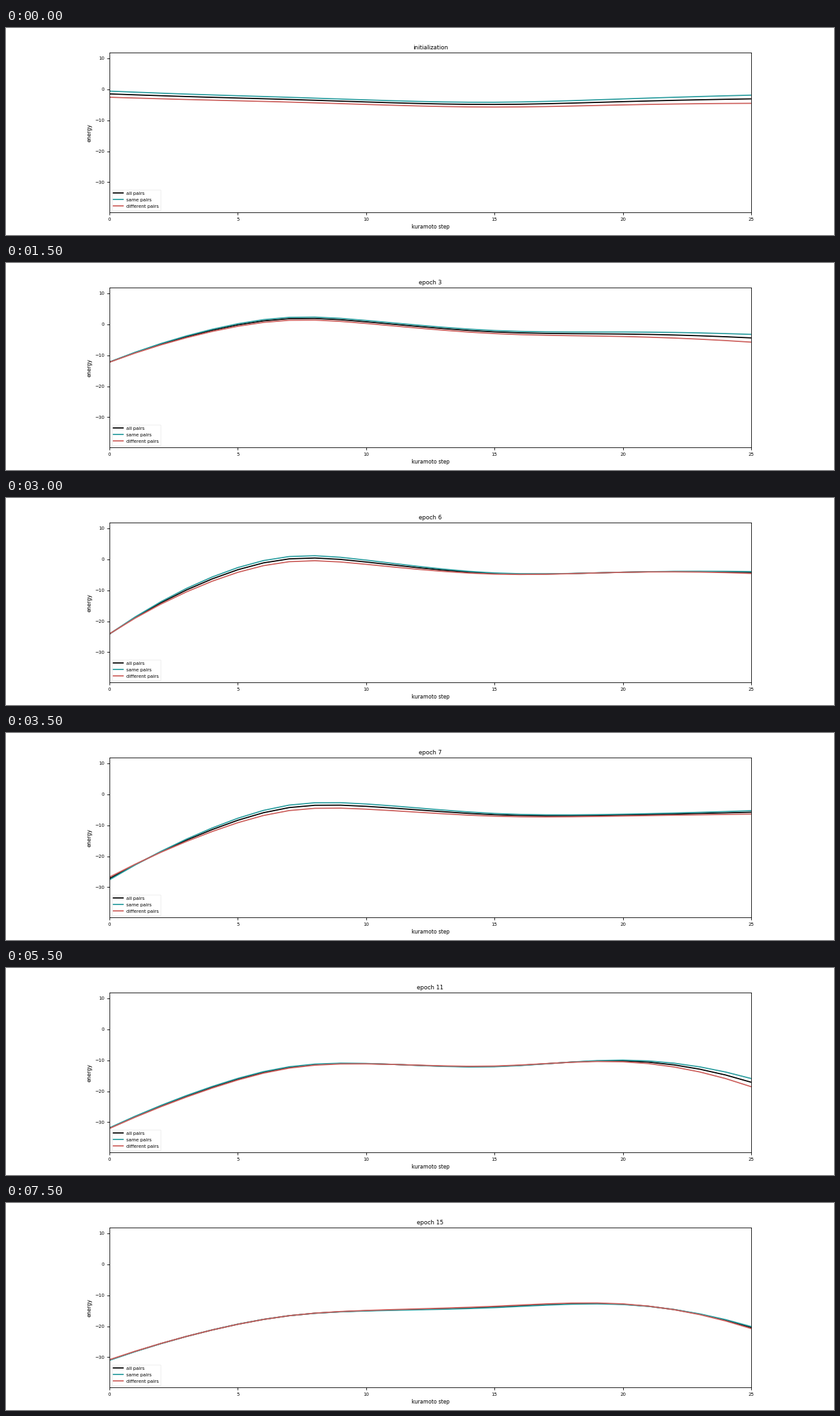
Write a matplotlib script that moves like this. It is 1280 by 320 pixels and loops after 8000 ms.

```python
import numpy as np
import matplotlib.pyplot as plt
from matplotlib.animation import FuncAnimation

plt.rcParams["font.family"] = "DejaVu Sans"

EPOCHS = 16
STEPS = np.arange(26)
MEAN_X = np.array([0, 4, 7, 10, 15, 20, 25])
LEAD_X = np.array([0, 7, 15, 25])
LEAD_RATIO = 1.2  # "different" lies this much further from the mean than "same"

# epoch: (mean energy at MEAN_X, lead of "same" over the mean at LEAD_X)
KEYS = {
    0: ([-1.5, -2.6, -3.3, -4.1, -4.9, -4, -3.1], [.9, .7, .7, 1.2]),
    1: ([-2.4, -3.9, -2.5, -1.5, -2.8, -5.5, -6.8], [-.4, .1, 1.1, 2.5]),
    4: ([-20.4, -.3, 5.4, 2.7, -2.2, -1.2, -2.4], [.4, .7, -.1, 0]),
    7: ([-27.2, -11.4, -4.3, -3.9, -6.6, -6.7, -5.8], [-.4, .8, .4, .5]),
    9: ([-30, -17.3, -11.1, -9.6, -9.8, -7, -9.7], [-.1, .6, -.2, .9]),
    11: ([-31.9, -18.7, -12.3, -11.1, -12, -10.2, -17.1], [.1, .2, -.1, 1.2]),
    15: ([-30.9, -21.2, -16.6, -15, -13.8, -12.9, -20.4], [-.1, 0, -.2, .3]),
}


def spline(xk, yk, x):
    """Cubic spline through (xk, yk) with parabolic end pieces."""
    h, n = np.diff(xk), len(xk)
    slope = np.diff(yk) / h
    a, b = np.eye(n), np.zeros(n)
    a[0, 1] = a[-1, -2] = -1
    for i in range(1, n - 1):
        a[i, i - 1:i + 2] = h[i - 1], 2 * (h[i - 1] + h[i]), h[i]
        b[i] = 6 * (slope[i] - slope[i - 1])
    m = np.linalg.solve(a, b)
    i = np.clip(np.searchsorted(xk, x, side="right") - 1, 0, n - 2)
    t, u = x - xk[i], xk[i + 1] - x
    return ((m[i] * u**3 + m[i + 1] * t**3) / (6 * h[i])
            + (yk[i] / h[i] - m[i] * h[i] / 6) * u
            + (yk[i + 1] / h[i] - m[i + 1] * h[i] / 6) * t)


def curves(epoch):
    """Energies of all, same and different pairs, eased between key epochs."""
    lo = max(k for k in KEYS if k <= epoch)
    hi = min(k for k in KEYS if k >= epoch)
    w = ((epoch - lo) / max(hi - lo, 1)) ** 1.5
    mean, lead = ((1 - w) * np.array(p) + w * np.array(q)
                  for p, q in zip(KEYS[lo], KEYS[hi]))
    mean = spline(MEAN_X, mean, STEPS)
    lead = spline(LEAD_X, lead, STEPS)
    return mean, mean + lead, mean - LEAD_RATIO * lead


fig, ax = plt.subplots(figsize=(16, 4), dpi=80)
fig.subplots_adjust(left=.125, right=.9, bottom=.109, top=.88)
styles = [("all pairs", "black"), ("same pairs", "#2a9d9f"),
          ("different pairs", "#cd5f5c")]
lines = [ax.plot([], [], color=c, lw=1.6, label=name)[0] for name, c in styles]
ax.set_xlim(0, 25)
ax.set_ylim(-39.75, 11.75)
ax.set_xticks(range(0, 26, 5))
ax.set_yticks(range(-30, 11, 10))
ax.tick_params(labelsize=6.4)
ax.set_xlabel("kuramoto step", fontsize=7.2, labelpad=3.5)
ax.set_ylabel("energy", fontsize=7.2, labelpad=3.5)
ax.legend(loc="lower left", fontsize=6.4, labelspacing=.57, edgecolor="0.92")
title = ax.set_title("", fontsize=8, pad=4.8)


def update(epoch):
    for line, y in zip(lines, curves(epoch)):
        line.set_data(STEPS, y)
    title.set_text(f"epoch {epoch}" if epoch else "initialization")
    return [*lines, title]


anim = FuncAnimation(fig, update, frames=EPOCHS, interval=500,
                     repeat=True, repeat_delay=0, blit=False)
plt.show()
```
